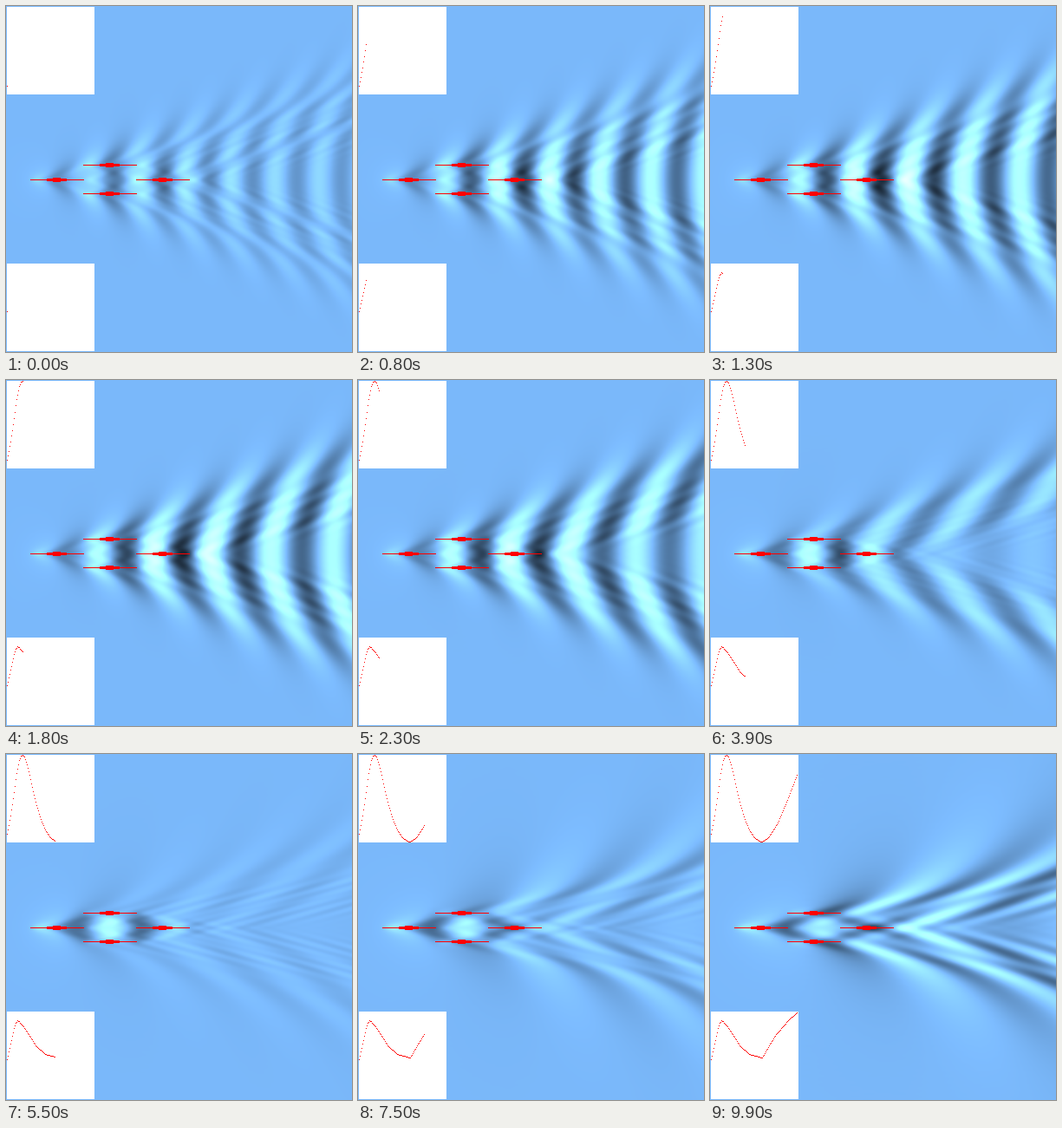
Animation of 399 by 399 pixels, one loop 10000 ms. Source, as an HTML page with a canvas:

```html
<!DOCTYPE html>
<html lang="en">
<head>
<meta charset="utf-8">
<title>Ship wakes at rising speed</title>
<style>
html, body { margin: 0; width: 100%; height: 100%; overflow: hidden; background: #7ab8fa; }
canvas { display: block; }
</style>
</head>
<body>
<canvas id="sea" width="399" height="399"></canvas>
<script>
const SIZE = 399, MID_X = 120, MID_Y = 200, STEPS = 100, STEP_MS = 100;
const LENGTH = 61, SPACING = 16.5;        // hull length and sideways offset
const DRAFT = 4, GAIN = 300;
const DK = 0.007, ETA = 0.007;            // wavenumber step, contour shift
const NX = 85, NY = 130;
const BASE = [122, 184, 250];

const ctx = document.getElementById('sea').getContext('2d');
const image = ctx.createImageData(SIZE, SIZE);
const wave = i => (i + 0.5) * DK;

// Complex numbers as [re, im]
const mul = ([a, b], [c, d]) => [a * c - b * d, a * d + b * c];
const div = ([a, b], [c, d]) => {
  const n = c * c + d * d;
  return [(a * c + b * d) / n, (b * c - a * d) / n];
};
const cosC = ([a, b]) => [Math.cos(a) * Math.cosh(b), -Math.sin(a) * Math.sinh(b)];
const sinC = ([a, b]) => [Math.sin(a) * Math.cosh(b), Math.cos(a) * Math.sinh(b)];

// Lookup tables for the two sums
const cosX = [], sinX = [], cosY = [], hulls = [];
for (let m = 0; m < NX; m++) {
  cosX.push(Float64Array.from({ length: SIZE }, (_, x) => Math.cos(wave(m) * (x - MID_X))));
  sinX.push(Float64Array.from({ length: SIZE }, (_, x) => Math.sin(wave(m) * (x - MID_X))));
  hulls.push(hullSpectrum(wave(m)));
}
for (let j = 0; j < NY; j++)
  cosY.push(Float64Array.from({ length: MID_Y + 1 }, (_, d) => Math.cos(wave(j) * d)));
const growth = Float64Array.from({ length: SIZE }, (_, x) =>
  GAIN * 4 * (DK / (2 * Math.PI)) ** 2 * Math.exp(ETA * (x - MID_X)));

// Parabolic waterline at kx = a - i*ETA, and the fore-and-aft pair of hulls
function hullSpectrum(a) {
  const kx = [a, -ETA], square = mul(kx, kx);
  const u = kx.map(v => v * LENGTH / 2);
  const s = sinC(u), c = mul(u, cosC(u));
  const shape = div([3 * (s[0] - c[0]), 3 * (s[1] - c[1])], mul(u, mul(u, u)));
  const pair = cosC(kx.map(v => v * LENGTH)).map(v => 2 * v);
  return { square, pair, source: mul(square, shape) };
}

// Linear ship wave field of four hulls in a diamond
function spectrum({ square, pair, source }, ky, k0) {
  const [qr, qi] = square, sr = qr + ky * ky;
  const kr = Math.sqrt((Math.hypot(sr, qi) + sr) / 2), ki = qi / (2 * kr);
  const depth = Math.exp(-DRAFT * kr);
  const draft = [depth * Math.cos(DRAFT * ki), -depth * Math.sin(DRAFT * ki)];
  const fleet = [pair[0] + 2 * Math.cos(SPACING * ky), pair[1]];
  return div(mul(mul(source, fleet), draft), [qr - k0 * kr, qi - k0 * ki]);
}

function drawSea(step) {
  const froude = 0.367 + 0.0035 * step;
  const k0 = 1 / (LENGTH * froude * froude);
  const rows = Array.from({ length: MID_Y + 1 }, () => new Float64Array(SIZE));
  const line = new Float64Array(SIZE);
  for (let j = 0; j < NY; j++) {
    line.fill(0);
    for (let m = 0; m < NX; m++) {
      const [re, im] = spectrum(hulls[m], wave(j), k0), c = cosX[m], s = sinX[m];
      for (let x = 0; x < SIZE; x++) line[x] += re * c[x] - im * s[x];
    }
    for (let d = 0; d <= MID_Y; d++) {
      const row = rows[d], c = cosY[j][d];
      for (let x = 0; x < SIZE; x++) row[x] += c * line[x];
    }
  }
  const px = image.data;
  for (let y = 0, p = 0; y < SIZE; y++) {
    const row = rows[Math.abs(y - MID_Y)];
    for (let x = 0; x < SIZE; x++, p += 4) {
      const light = Math.max(0.2, 1 + row[x] * growth[x]);
      for (let c = 0; c < 3; c++) px[p + c] = BASE[c] * light;
      px[p + 3] = 255;
    }
  }
  ctx.putImageData(image, 0, 0);
}

function rect(color, x, y, w, h) {
  ctx.fillStyle = color;
  ctx.fillRect(x, y, w, h);
}

function drawHull(x, y) {
  rect('#f00', x - 31, y, 62, 1);
  rect('#f00', x - 12, y - 1, 23, 3);
  rect('#f00', x - 5, y - 2, 9, 5);
}

// Graph points: step, height, step, height ...
const upper = [0, 92, 4, 71, 8, 44, 11, 22, 14, 7, 16, 2, 18, 1, 20, 3, 23, 12, 26, 24, 30, 43,
  34, 59, 40, 78, 45, 89, 50, 96, 55, 100, 59, 101, 62, 99, 66, 96, 71, 89, 77, 79, 88, 53, 99, 24];
const lower = [0, 352, 4, 334, 8, 316, 10, 310, 12, 307, 14, 308, 16, 311, 18, 313, 23, 320,
  30, 331, 33, 336, 44, 346, 55, 349, 59, 350, 67, 336, 75, 323, 78, 320, 89, 307, 99, 298];

function valueAt(pts, n) {
  let i = 0;
  while (i < pts.length - 4 && pts[i + 2] < n) i += 2;
  const [x0, y0, x1, y1] = pts.slice(i, i + 4);
  return Math.round(y0 + (y1 - y0) * (n - x0) / (x1 - x0));
}

function drawGraph(top, pts, step) {
  rect('#fff', 1, top, 101, 101);
  for (let n = 0; n <= step; n++) rect('#f00', 1 + n, valueAt(pts, n), 1, 1);
}

let shown = -1;
function tick() {
  const step = Math.floor(performance.now() / STEP_MS) % STEPS;
  if (step !== shown) {
    shown = step;
    drawSea(step);
    for (const [x, y] of [[59, 200], [120, 183], [120, 216], [181, 200]]) drawHull(x, y);
    drawGraph(1, upper, step);
    drawGraph(297, lower, step);
  }
  requestAnimationFrame(tick);
}
tick();
</script>
</body>
</html>
```
